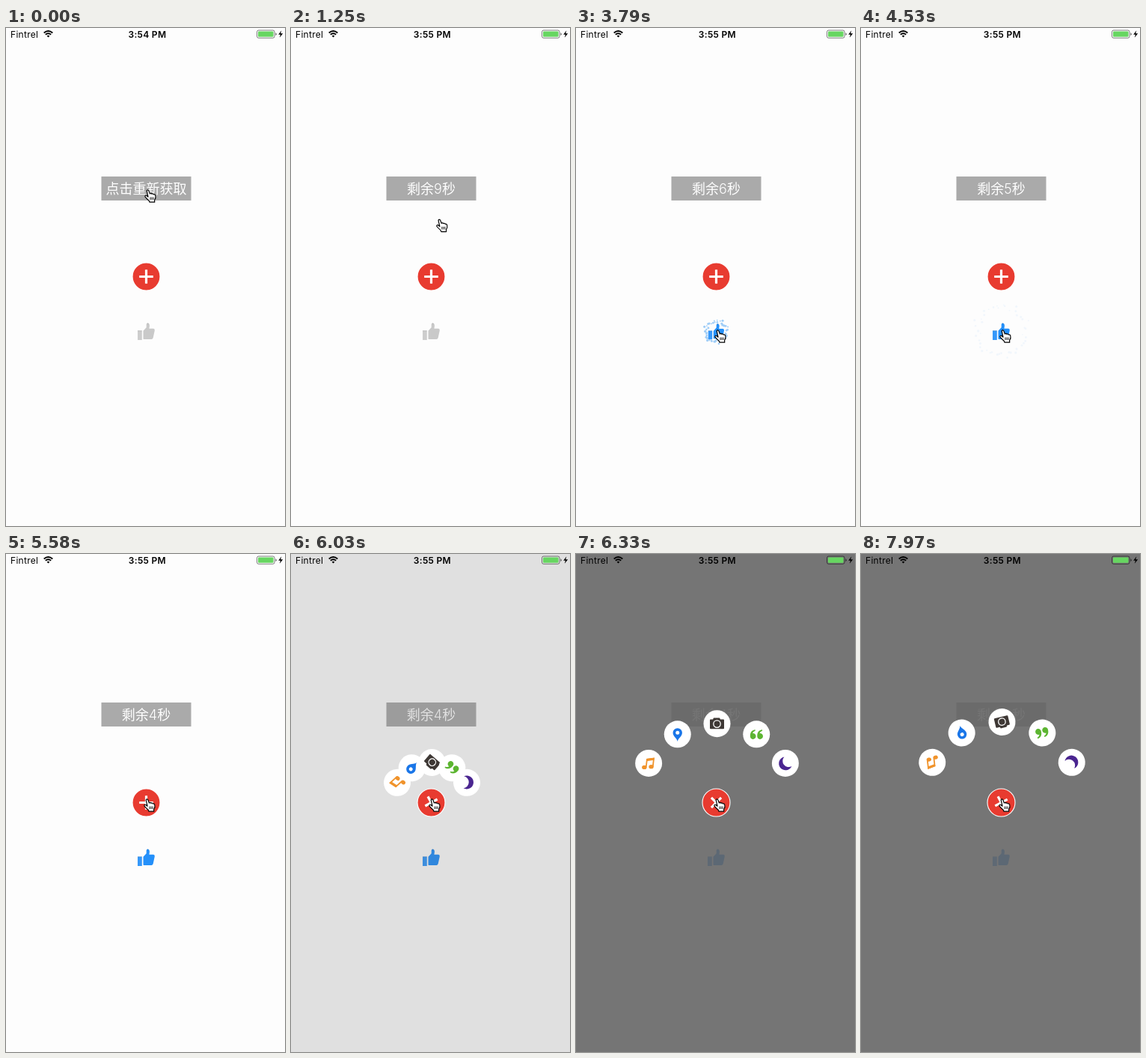
These frames come from a looping animation (373x664 px, 8 s). An HTML page:

```html
<!DOCTYPE html>
<html lang="zh-CN">
<head>
<meta charset="utf-8">
<title>Button effects</title>
<style>
  html, body { margin: 0; width: 100%; height: 100%; overflow: hidden; background: #fdfdfd; }
  svg { display: block; width: 100%; height: 100%; }
  text { font-family: Inter, "Noto Sans CJK SC", "Noto Sans CJK", sans-serif; font-size: 12px; letter-spacing: .3px; }
  #label { font-size: 18px; font-weight: 300; fill: #fff; text-anchor: middle; letter-spacing: 0; }
  #clock { font-weight: 600; text-anchor: middle; }
</style>
</head>
<body>
<svg viewBox="0 0 373 664">
  <rect width="373" height="664" fill="#fdfdfd"/>
  <rect x="127.5" y="198" width="120" height="32" fill="#aaa"/>
  <text id="label" x="187.5" y="220.7"></text>

  <g id="sparks" fill="#84bff6"></g>
  <g id="thumb">
    <path d="M-11.5 -1.5h5.8v12.5h-5.8z" opacity=".92"/>
    <path d="M-4 -1.2L.2 -5.8V-9.5Q.3 -11.5 2 -11.5Q4.7 -11 4.4 -7.5L3.9 -4.2H9.6Q11.6 -4 11.3 -1.8L9.2 8Q8.6 9.9 6.8 9.9H-3.2Q-4 9.9 -4 9z"/>
    <path d="M-11.5 -1.2h5.8M.9 -10.8Q2 -11.8 3.6 -10.6" fill="none" stroke="#000" stroke-opacity=".16" stroke-width=".8"/>
  </g>

  <rect id="shade" width="373" height="664" fill="#646464"/>

  <g id="petals">
    <g fill="#f0932b"><circle r="18" fill="#fff"/>
      <ellipse cx="-5.8" cy="5.5" rx="3.2" ry="2.6"/><ellipse cx="3.4" cy="4.7" rx="3.2" ry="2.6"/>
      <path d="M-3.5 5.5L-2.2 -5.2L6.9 -6.5L5.6 4.7" fill="none" stroke="#f0932b" stroke-width="1.8"/>
      <path d="M-2.9 -6L7.6 -7.3L7.2 -4.1L-2.9 -2.8z"/></g>
    <g fill="#1a76e8"><circle r="18" fill="#fff"/>
      <path d="M0 9.7C-1 5 -6.2 3 -6.2 -2A6.2 6.2 0 1 1 6.2 -2C6.2 3 1 5 0 9.7z"/><circle cy="-2.2" r="2.5" fill="#fff"/></g>
    <g fill="#3e3835"><circle r="18" fill="#fff"/>
      <path d="M-8.5 -5.8H-5.5L-4.5 -7.8H3.5L4.5 -5.8H8.5Q9.5 -5.8 9.5 -4.8V6Q9.5 7 8.5 7H-8.5Q-9.5 7 -9.5 6V-4.8Q-9.5 -5.8 -8.5 -5.8z"/>
      <circle cy=".4" r="4.7" fill="none" stroke="#fff" stroke-width="1.3"/></g>
    <g fill="#5cb531"><circle r="18" fill="#fff"/>
      <path id="quote" d="M-8.4 2C-8.4 -3 -5.8 -5.8 -1.6 -6.2V-4.5C-3.8 -3.8 -4.8 -2.5 -5 -1.2A3.9 3.9 0 1 1 -8.4 2z"/>
      <use href="#quote" x="9.4"/></g>
    <g fill="#4a2590"><circle r="18" fill="#fff"/>
      <path d="M-1.5 -8.5A9 9 0 1 0 8.5 4A8.1 8.1 0 0 1 -1.5 -8.5z"/></g>
  </g>

  <g transform="translate(187.5 331.5)">
    <circle r="18.5" fill="#e83b30" stroke="#fff" stroke-width="1.1"/>
    <path id="plus" d="M-9.3 0H9.3M0 -9.3V9.3" stroke="#fff" stroke-width="3.2"/>
  </g>

  <text x="6" y="12.5">Fintrel</text>
  <g fill="none" stroke="#000" stroke-width="1.8">
    <path d="M50.7 6.5Q56.5 1.5 62.3 6.5M52.8 8.8Q56.5 5.6 60.2 8.8"/>
    <path d="M54.6 10.5Q56.5 9 58.4 10.5L56.5 12.6z" fill="#000" stroke="none"/>
  </g>
  <text id="clock" x="188.9" y="12.5"></text>
  <rect x="335.5" y="3" width="23.5" height="10.3" rx="2.2" fill="none" stroke="#000" stroke-opacity=".5"/>
  <rect x="337" y="4.5" width="20.5" height="7.3" rx="1" fill="#67d661"/>
  <path d="M360.3 6.3Q361.8 7 361.8 8.2T360.3 10z" fill-opacity=".55"/>
  <path d="M368.3 3.3L364.2 8.7H366.9L365.8 12.8L370.2 7.3H367.2z"/>

  <g id="cursor" stroke="#000" stroke-width="1.2" stroke-linejoin="round">
    <path d="M3.2 2.2C3.2 .6 5.4 .4 5.9 2L7.4 6C8.3 5 9.6 5.4 9.9 6.3C10.8 5.6 12 6 12.3 7C13.6 6.5 14.5 7.2 14.8 8.4C15.6 11 14.6 13 13.6 14.5L13.7 17.2H7L6.2 15.2C4.5 13.8 2.6 12 .9 9.8C.6 8 2.5 7.8 3.6 9L5 10.2z" fill="#fff"/>
    <path d="M8 10.5V14M10 10.5V14M12 10.5V14" stroke-width=".9"/>
  </g>
</svg>
<script>
const LOOP = 8000, FRAME = 149.4;
const TAP = 490, CLOCK_TURN = 800, LIKE = 3490, BURST = 3640, OPEN = 5953, CLOSE = 7920;

const ui = {};
for (const id of ["label", "clock", "sparks", "thumb", "shade", "petals", "plus", "cursor"]) {
  ui[id] = document.getElementById(id);
}

const progress = (start, end, t) => Math.min(1, Math.max(0, (t - start) / (end - start)));
const smooth = u => u * u * (3 - 2 * u);
const easeOut = u => 1 - (1 - u) ** 2;

// The picture advances in steps of FRAME, in phase with 500 ms.
const step = t => 500 + Math.floor((t - 500) / FRAME + 0.05) * FRAME;

let seed = 7;
const random = () => (seed = seed * 16807 % 2147483647) / 2147483647;
const sparks = Array.from({ length: 44 }, (_, i) => {
  const node = document.createElementNS("http://www.w3.org/2000/svg", "circle");
  node.setAttribute("r", 0.8 + random() * 0.9);
  ui.sparks.append(node);
  return { node, angle: (i + random()) / 44 * 2 * Math.PI, start: 8 + random() * 5, speed: 20 + random() * 10 };
});

function place(node, x, y, extra = "") {
  node.setAttribute("transform", `translate(${x} ${y}) ${extra}`);
}

function drawCountdown(t) {
  const seconds = 9 - Math.floor((t - TAP) / 1000);
  ui.label.textContent = t < TAP ? "点击重新获取" : `剩余${seconds}秒`;
  ui.clock.textContent = t < CLOCK_TURN ? "3:54 PM" : "3:55 PM";
}

function drawCursor(t) {
  let x = 185, y = 215;
  const move = (start, end, dx, dy) => {
    const u = smooth(progress(start, end, t));
    x += dx * u;
    y += dy * u;
  };
  move(500, 1700, 13, 58);
  move(2000, 2450, 7, 79);
  move(2450, 2890, -20, 50);
  move(4530, 4980, -1, -76);
  place(ui.cursor, x, y);
}

function drawLike(t) {
  const liked = t >= LIKE;
  const age = t - LIKE;
  const scale = liked ? 1 + 0.3 * Math.exp(-age / 200) * Math.cos(age / 100) : 1;
  place(ui.thumb, 187.5, 405, `scale(${scale})`);
  ui.thumb.setAttribute("fill", liked ? "#2490fa" : "#c9c9c9");

  const life = (t - BURST) / 1000;
  ui.sparks.setAttribute("opacity", life < 0 ? 0 : Math.max(0, 0.9 - life * 0.9));
  for (const { node, angle, start, speed } of sparks) {
    const radius = start + speed * Math.max(0, life);
    place(node, 187 + radius * Math.cos(angle), 405 + radius * Math.sin(angle));
  }
}

function drawMenu(t) {
  const opening = progress(OPEN, OPEN + 250, t);
  const closing = progress(CLOSE, CLOSE + 300, t);
  const radius = 105.5 * easeOut(opening) + 13 * closing;
  const turn = 450 * (1 - easeOut(opening)) + 1000 * closing;
  ui.shade.setAttribute("opacity", 0.885 * smooth(opening));
  ui.plus.setAttribute("transform", `rotate(${-135 * smooth(opening) + 100 * closing})`);
  ui.petals.style.display = opening ? "" : "none";
  [...ui.petals.children].forEach((petal, i) => {
    const angle = (210 + 30 * i) * Math.PI / 180;
    place(petal, 188.5 + radius * Math.cos(angle), 331.7 + radius * Math.sin(angle), `rotate(${turn})`);
  });
}

const startTime = performance.now();
function tick() {
  const t = step((performance.now() - startTime) % LOOP);
  drawCountdown(t);
  drawCursor(t);
  drawLike(t);
  drawMenu(t);
  requestAnimationFrame(tick);
}
tick();
</script>
</body>
</html>
```
